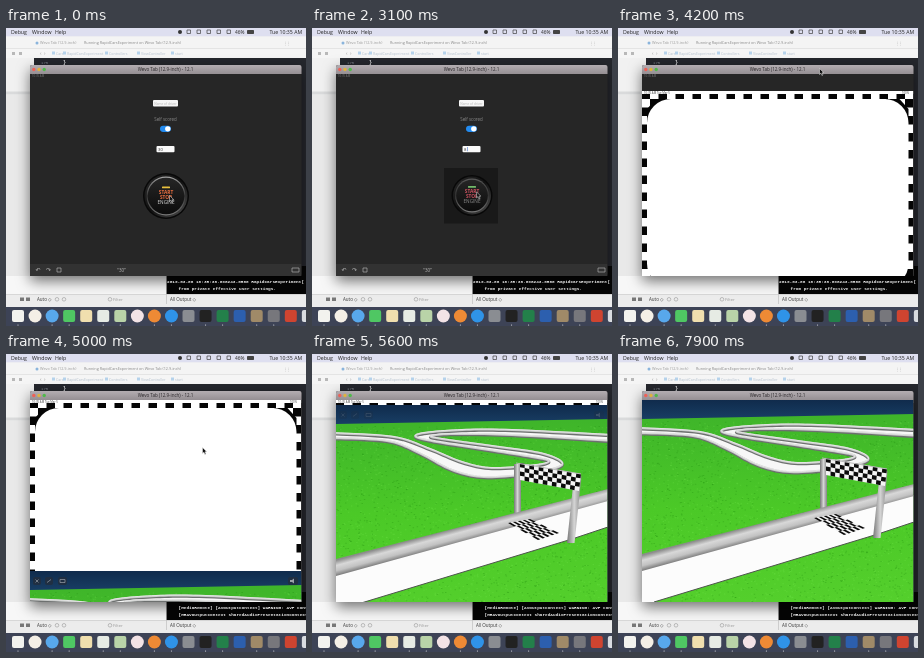
Write an HTML page with a canvas that moves like this. It is 300 by 298 pixels and loops after 8 s.

```html
<!DOCTYPE html>
<html lang="en">
<head>
<meta charset="utf-8">
<title>Race track demo</title>
<style>
html, body { margin: 0; width: 100%; height: 100%; overflow: hidden; background: #e8e8e8; }
canvas { display: block; width: 300px; height: 298px; }
</style>
</head>
<body>
<canvas id="stage" width="300" height="298"></canvas>
<script>
const LOOP = 8000, STEP = 100;
const WIN = { x: 24, y: 37, top: 46, right: 295.5, bottom: 248 };
const VIEW_W = WIN.right - WIN.x, VIEW_H = WIN.bottom - WIN.top;
const SANS = '"Open Sans", sans-serif', MONO = '"Liberation Mono", monospace';
const DEVICE = 'Wevo Tab (12.9-inch)', PROJECT = 'RapidCarsExperiment';
const stage = document.getElementById('stage').getContext('2d');
let g = stage;

function layer(paint) {
  const canvas = document.createElement('canvas');
  canvas.width = 300;
  canvas.height = 298;
  g = canvas.getContext('2d');
  paint();
  g = stage;
  return canvas;
}

function box(x, y, w, h, color, r = 0) {
  g.fillStyle = color;
  g.beginPath();
  g.roundRect(x, y, w, h, r);
  g.fill();
}

function disc(x, y, r, color) {
  g.fillStyle = color;
  g.beginPath();
  g.arc(x, y, r, 0, Math.PI * 2);
  g.fill();
}

function poly(points, color) {
  g.fillStyle = color;
  g.beginPath();
  points.forEach(([x, y]) => g.lineTo(x, y));
  g.closePath();
  g.fill();
}

function line(points, color, width = 0.7) {
  g.strokeStyle = color;
  g.lineWidth = width;
  g.beginPath();
  points.forEach(([x, y]) => g.lineTo(x, y));
  g.stroke();
}

function label(text, x, y, size, color, align = 'left', family = SANS, weight = '') {
  g.font = `${weight} ${size}px ${family}`;
  g.fillStyle = color;
  g.textAlign = align;
  g.fillText(text, x, y);
}

function blend(x0, y0, x1, y1, ...colors) {
  const gradient = g.createLinearGradient(x0, y0, x1, y1);
  colors.forEach((c, i) => gradient.addColorStop(i / (colors.length - 1), c));
  return gradient;
}

// Samples a Catmull-Rom curve through the given points.
function smooth(points) {
  const out = [], last = points.length - 1;
  for (let i = 0; i < last; i++) {
    const [a, b, c, d] = [-1, 0, 1, 2].map(k => points[Math.min(last, Math.max(0, i + k))]);
    for (let u = 0; u < 1; u += 0.1) {
      out.push([0, 1].map(k => b[k] + u / 2 * (c[k] - a[k] +
        u * (2 * a[k] - 5 * b[k] + 4 * c[k] - d[k] + u * (3 * (b[k] - c[k]) + d[k] - a[k])))));
    }
  }
  return [...out, points[last]];
}

// Checker pattern inside a quad given clockwise from its top left.
function checkerQuad([a, b, c, d], cols, rows) {
  const at = (u, v) => [0, 1].map(i =>
    (a[i] * (1 - u) + b[i] * u) * (1 - v) + (d[i] * (1 - u) + c[i] * u) * v);
  poly([a, b, c, d], '#f4f4f4');
  for (let i = 0; i < cols; i++) {
    for (let j = 0; j < rows; j++) {
      if ((i + j) % 2) continue;
      const [u, v, s, t] = [i / cols, j / rows, (i + 1) / cols, (j + 1) / rows];
      poly([at(u, v), at(s, v), at(s, t), at(u, t)], '#0b0b0b');
    }
  }
}

function paintDock() {
  box(0, 279, 300, 19, '#3d4356');
  const dock = ['#f2f2ee', '#f4efe6', '#58a8ec', '#4fc763', '#f0dfae', '#e6ebe4', '#b9d3a8',
    '#f3e3e6', '#ee8a35', '#2f93e8', '#8a8d92', '#222222', '#23804a',
    '#2c5fae', '#a08a68', '#77777c', '#cf4430', '#d9dce0'];
  dock.forEach((color, i) => {
    const x = 12 + i * 17.05;
    if ([1, 2, 7, 8, 9].includes(i)) disc(x, 288, 6.5, color);
    else box(x - 6, 282, 12, 12, color, 2);
    if (i % 3 !== 1) disc(x, 297, 0.6, '#ddd');
  });
}

function paintDesktop() {
  box(0, 0, 300, 298, '#f1f1f1');
  box(0, 0, 300, 8.5, '#dedff0');
  label('Debug', 5, 6, 5.2, '#222');
  label('Window', 26, 6, 5.2, '#222');
  label('Help', 49, 6, 5.2, '#222');
  disc(174, 4, 2, '#333');
  for (let x = 181; x < 225; x += 10) {
    line([[x, 5.5], [x, 2], [x + 3.5, 2], [x + 3.5, 5.5], [x, 5.5]], '#444');
  }
  label('46%', 229, 6, 4.8, '#222');
  box(241, 2, 7, 4, '#444', 0.7);
  label('Tue 10:35 AM', 263.5, 6, 5.2, '#222');

  box(0, 8.5, 300, 12, '#f4f4f4');
  disc(31, 15, 1.5, '#8ab4dc');
  label(DEVICE, 34, 16.3, 3.8, '#999');
  label(`Running ${PROJECT} on ${DEVICE}`, 78, 16.3, 3.8, '#888');
  [277, 280].forEach(x => label('⋮', x, 16.5, 4.5, '#999'));
  line([[0, 20.5], [300, 20.5]], '#dedede');

  box(0, 21, 300, 9, '#f5f5f5');
  label('‹  ›', 34, 27, 5, '#999');
  ['Cars', PROJECT, 'Controllers', 'ViewController', 'start'].forEach((name, i) => {
    const x = [50, 61, 103, 135, 169][i];
    box(x - 4, 23.5, 3, 3, '#b5d2eb');
    label(name, x, 27, 3.6, '#b3c0ce');
  });
  for (let x = 6; x < 20; x += 7) box(x, 24, 3, 3, '#b8b8b8');

  box(0, 30, 28, 236, '#f1f1f1');
  box(0, 63.5, 26, 3, '#d9dadb');
  box(0, 67, 26, 181, '#e9e9e9');
  box(28, 30, 272, 218, '#25272d');
  label('175', 35, 36, 4, '#7d838c', 'left', MONO);
  label('}', 57, 36, 5, '#eee', 'left', MONO, 'bold');

  box(0, 248, 160, 18, '#f7f7f7');
  box(160, 238, 140, 28, '#050505');
  box(0, 266, 300, 13, '#ececec');
  line([[0, 266.5], [300, 266.5]], '#cfcfcf');
  line([[160.5, 248], [160.5, 276]], '#c0c0c0');
  [14, 20].forEach(x => box(x, 269.5, 4, 3.5, '#777'));
  label('Auto ◇', 31, 273, 4.5, '#333');
  [51, 58, 104].forEach(x => {
    g.lineWidth = 0.6;
    g.strokeStyle = '#999';
    g.beginPath();
    g.arc(x, 271.3, 1.8, 0, 7);
    g.stroke();
  });
  label('Filter', 107, 273, 4.2, '#999');
  label('All Output ◇', 164, 273, 4.5, '#333');
  paintDock();

  g.shadowColor = 'rgba(0,0,0,.55)';
  g.shadowBlur = 14;
  g.shadowOffsetY = 5;
  box(WIN.x, WIN.y, VIEW_W, WIN.bottom - WIN.y, '#262626', 2);
  g.shadowColor = 'transparent';
  box(WIN.x, WIN.y, VIEW_W, 9, blend(0, 37, 0, 46, '#b3adb1', '#958f93'), [2, 2, 0, 0]);
  ['#ee6158', '#dfb23f', '#50b94c'].forEach((c, i) => disc(27.8 + i * 5.2, 41.5, 1.7, c));
  label(`${DEVICE} - 12.1`, 159.5, 43.2, 4.5, '#262326', 'center');
}

function paintGrass() {
  poly([[24, 65], [296, 60], [296, 248], [24, 248]],
    blend(0, 62, 0, 248, '#3fb52a', '#4bc927', '#54cf2c'));
  let seed = 17;
  const random = () => (seed = seed * 16807 % 2147483647) / 2147483647;
  for (let i = 0; i < 3000; i++) {
    const shade = random() < 0.5 ? 'rgba(20,120,5,.24)' : 'rgba(130,240,90,.2)';
    box(24 + random() * 272, 67 + random() * 181, 1.4, 1, shade);
  }
}

function paintFarRoad() {
  const outer = smooth([[20, 79], [75, 82], [105, 93], [140, 111], [172, 118], [215, 115],
    [250, 106], [232, 95], [180, 87], [130, 80], [119, 77], [142, 75], [200, 76], [300, 82]]);
  const inner = smooth([[20, 74], [82, 78], [118, 90], [150, 103], [180, 109], [224, 106],
    [237, 102], [220, 98], [170, 90], [125, 83], [104, 78], [112, 74], [150, 71], [200, 71], [300, 76]]);
  poly([...outer, ...[...inner].reverse()], '#f7f7f7');
  [inner, outer].forEach(edge => {
    line(edge.map(([x, y]) => [x, y + 1]), '#6d706f', 2.6);
    line(edge, '#c9cbca', 2);
    line(edge.map(([x, y]) => [x, y - 0.5]), '#ececec', 0.8);
  });
}

function paintTrack() {
  g.beginPath();
  g.rect(24, 46, VIEW_W, VIEW_H);
  g.clip();
  box(24, 46, 272, 202, blend(0, 46, 0, 65, '#102b4c', '#183e64'));
  paintGrass();
  paintFarRoad();

  const post = ([x0, y0], [x1, y1], w) =>
    poly([[x0, y0], [x0 + w, y0], [x1 + w, y1], [x1, y1]],
      blend(x1, 0, x0 + w, 0, '#777', '#d5d5d5', '#858585'));
  post([202, 105], [202, 160], 7);

  poly([[24, 214], [296, 141], [296, 168], [260, 180], [36, 248], [24, 248]], '#fcfcfc');
  line([[36, 248], [260, 180], [296, 168]], '#4d544c', 1);
  poly([[24, 200], [296, 130], [296, 142], [24, 217]],
    blend(156, 166, 160, 181, '#8c8c8c', '#d8d8d8', '#c2c2c2', '#777'));
  checkerQuad([[196, 164], [218, 160], [247, 174], [226, 181]], 9, 5);

  post([262, 117], [255, 184], 7.5);
  checkerQuad([[208, 104], [269, 115], [267, 132], [208, 121]], 13, 4);
  line([[204, 104], [269, 115]], '#bbb', 1);
}

function paintSheet() {
  g.beginPath();
  g.rect(24, 46, VIEW_W, VIEW_H);
  g.clip();
  box(24, 46, VIEW_W, VIEW_H, '#fff');
  const cell = 8.5;
  for (let col = 0; col < 34; col++) {
    for (let row = 0; row < 25; row++) {
      if ((col + row) % 2) box(15 + col * cell, 45.5 + row * cell, cell, cell, '#050505');
    }
  }
  [[24, 1], [295.5, -1]].forEach(([x, side]) =>
    poly([[x + 5 * side, 64], [x + 14 * side, 54], [x + 28 * side, 54], [x + 5 * side, 78]], '#050505'));
  box(29, 54, 261.5, 188.5, '#fff', 24);
  box(24, 46, VIEW_W, 3, '#fff');
  label('10:35 AM Tue Mar 5', 26, 48.5, 2.8, '#444');
  label('100%', 291, 48.5, 2.8, '#444', 'right');
}

function drawButton(pressed) {
  const x = 160, y = pressed ? 167.5 : 168, r = pressed ? 20.5 : 23;
  if (pressed) box(132, 140, 54, 55.5, '#191919');
  disc(x, y, r, '#080808');
  disc(x, y, r - 1.5, blend(x - r, y - r, x + r, y + r, '#2c2c2c', '#101010', '#555'));
  disc(x, y, r - 3.5, blend(x, y - r, x, y + r, pressed ? '#606060' : '#bbbbbb', '#343434', '#888'));
  disc(x, y, r - 4.7, blend(x, y - r, x, y + r, '#292929', '#080808'));
  box(x - 4, y - 9.5, 8, 1.8, pressed ? '#72b969' : '#e8c03d', 0.5);
  const hot = pressed ? '#cc5260' : '#ed7041';
  label('START', x, y - 2.5, 4.8, hot, 'center', SANS, 'bold');
  label('STOP', x, y + 2.5, 4.8, hot, 'center', SANS, 'bold');
  label('ENGINE', x, y + 7.5, 4.7, pressed ? '#8b8b8b' : '#dddddd', 'center');
}

function drawForm(t) {
  box(24, 46, VIEW_W, VIEW_H, '#262626');
  label('10:35 AM', 26, 49, 2.8, '#777');
  box(147, 72, 25, 6.5, '#f6f6f6', 1);
  label('Name of driver', 159.5, 76.5, 3.2, '#b5b5b5', 'center');
  label('Self scored', 159.5, 93.2, 4.4, '#8d8d8d', 'center');
  box(154, 97.7, 11, 6.3, '#238bef', 3.2);
  disc(161.8, 100.85, 2.7, '#fff');
  box(150.5, 118, 18, 6.3, '#fafafa', 1);
  label(t < 100 ? '30' : '8', 152, 122.8, 4.2, '#333');
  if (t >= 100) box(155.3, 119, 0.6, 4.2, '#4b78cf');
  drawButton(t >= 300);
  box(24, 236, VIEW_W, 12, '#323232');
  label('↶', 29.5, 244, 6, '#bbb');
  label('↷', 40, 244, 6, '#bbb');
  line([[51, 240], [55, 240], [55, 244], [51, 244], [51, 240]], '#aaa');
  label('“30”', 115.5, 244, 4.5, '#bbb', 'center');
  line([[286, 240], [293, 240], [293, 244], [286, 244], [286, 240]], '#aaa');
}

function drawControls(top) {
  [[27, 8], [39, 8], [52, 9], [282, 10]].forEach(([x, w]) =>
    box(x, top + 6, w, 8, 'rgba(35,45,60,.8)', 2));
  const ink = '#9aa0a8';
  line([[29.5, top + 8.5], [32.5, top + 11.5]], ink);
  line([[32.5, top + 8.5], [29.5, top + 11.5]], ink);
  line([[41, top + 11.5], [45, top + 8.5]], ink);
  line([[54, top + 8.5], [59, top + 8.5], [59, top + 11.5], [54, top + 11.5], [54, top + 8.5]], ink);
  poly([[284, top + 9], [286, top + 9], [288, top + 7.5], [288, top + 12.5], [286, top + 11], [284, top + 11]], ink);
}

function drawConsole(t) {
  const lines = t < 4900
    ? [`2019-03-06 10:35:38.098243-0500 ${PROJECT}[`, 'from private effective user settings.']
    : ['[MediaRemote] [AVOutputContext] WARNING: AVF context', '[MRAVOutputContext sharedAudioPresentationContext'];
  lines.forEach((text, i) =>
    label(text, t < 4900 && !i ? 161 : 172.5, 255.3 + i * 7, 4.4, '#f3f3f3', 'left', MONO, 'bold'));
}

// Remaining share of a critically damped slide.
function remaining(t, start, rate) {
  const p = Math.max(0, t - start) / 1000 * rate;
  return (1 + p) * Math.exp(-p);
}

const ease = (t, a, b) => {
  const p = Math.min(1, Math.max(0, (t - a) / (b - a)));
  return p * p * (3 - 2 * p);
};

function drawCursor(t) {
  if (t > 5200) return;
  const up = ease(t, 3000, 4000), down = ease(t, 4400, 5000);
  g.save();
  g.translate(163.5 + 38 * up - 5 * down, 167.5 - 127 * up + 53 * down);
  const arrow = [[0, 0], [0, 6], [1.4, 4.7], [2.4, 7], [3.5, 6.5], [2.5, 4.3], [4.3, 4.2]];
  poly(arrow, '#111');
  line([...arrow, arrow[0]], '#eee', 0.5);
  g.restore();
}

const desktop = layer(paintDesktop);
const sheet = layer(paintSheet);
const track = layer(paintTrack);

function draw(t) {
  g.clearRect(0, 0, 300, 298);
  g.drawImage(desktop, 0, 0);
  drawConsole(t);
  g.save();
  g.beginPath();
  g.rect(WIN.x, WIN.top, VIEW_W, VIEW_H);
  g.clip();
  drawForm(t);
  if (t >= 4000) {
    box(24, 236, VIEW_W, 12, '#262626');
    g.drawImage(sheet, 0, Math.round(VIEW_H * remaining(t, 3950, 16.5)));
  }
  if (t >= 4900) {
    const shift = Math.round(VIEW_H * remaining(t, 4916, 8.3));
    g.drawImage(track, 0, shift);
    g.globalAlpha = 1 - ease(t, 5400, 5700);
    drawControls(46 + shift);
  }
  g.restore();
  drawCursor(t);
}

const origin = performance.now();
function tick() {
  const t = (performance.now() - origin) % LOOP;
  draw(Math.floor(t / STEP) * STEP);
  requestAnimationFrame(tick);
}
tick();
</script>
</body>
</html>
```
